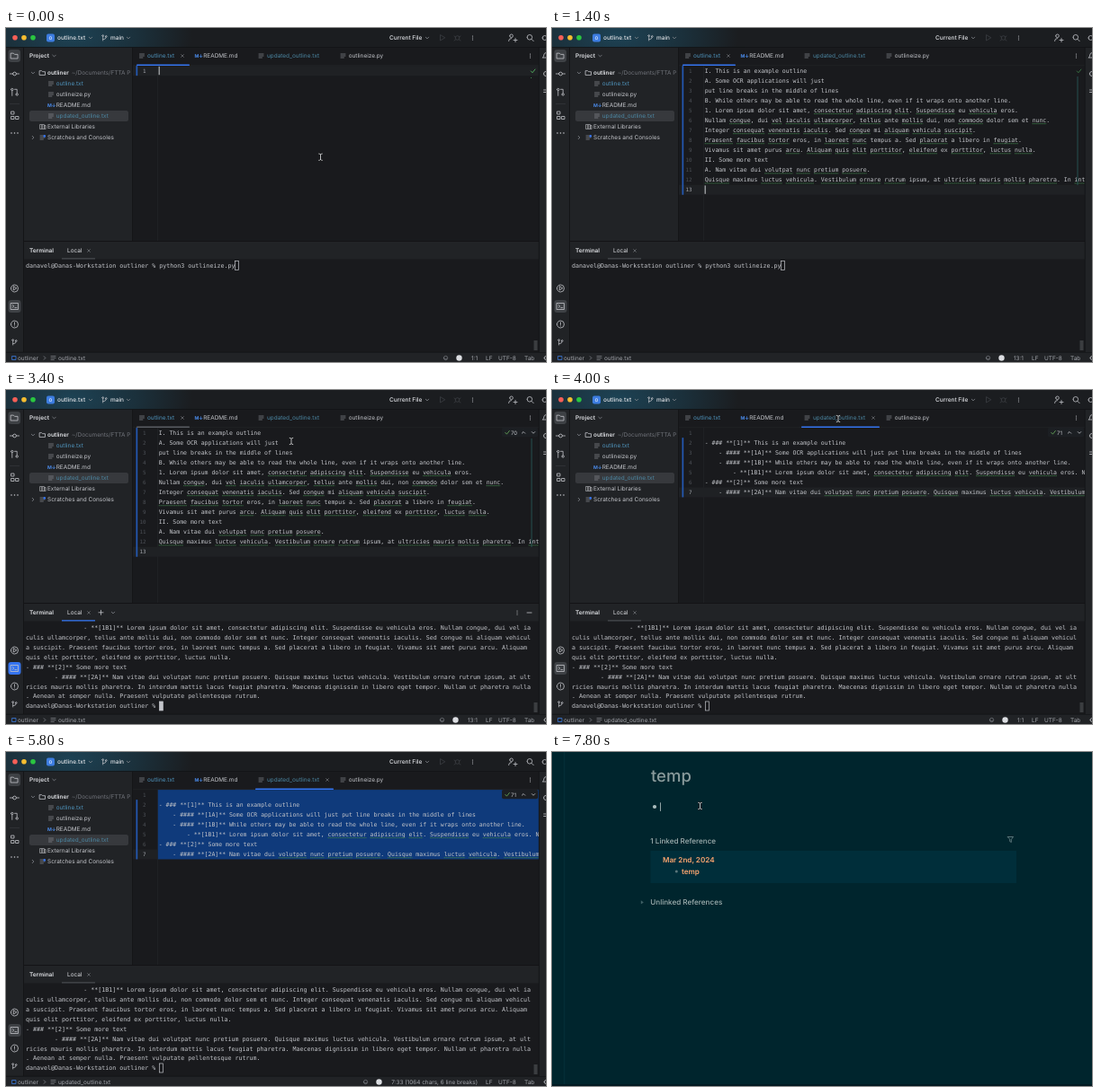
Recreate the animation shown at these times as an HTML page. Size 600x372 px, loop 8 s.

```html
<!DOCTYPE html>
<html lang="en">
<head>
<meta charset="utf-8">
<title>Outline workflow</title>
<style>
  html, body { margin: 0; width: 100%; height: 100%; overflow: hidden; background: #191a1d; }
  svg { display: block; width: 100vw; height: 100vh; }
  text { font-family: Inter, "Open Sans", sans-serif; text-rendering: geometricPrecision; }
  .mono { font-family: "DejaVu Sans Mono", "Noto Sans Mono", monospace; }
  .icon { fill: none; stroke-linecap: round; stroke-linejoin: round; }
</style>
</head>
<body>
<svg id="stage" viewBox="0 0 600 372">
  <defs>
    <radialGradient id="glow" gradientUnits="userSpaceOnUse" cx="72" cy="8" r="135" gradientTransform="translate(0 4) scale(1 .5)">
      <stop offset="0" stop-color="#1d4254"/>
      <stop offset=".55" stop-color="#1b303b"/>
      <stop offset="1" stop-color="#1b1d20"/>
    </radialGradient>
    <clipPath id="treeClip"><rect x="20" y="22" width="120.5" height="215"/></clipPath>
  </defs>
</svg>
<script>
const LOOP = 8000, STEP = 200;
const AT = { paste: 800, terminal: 2000, run: 2400, openTab: 4000, click: 4400, selectAll: 5200, notes: 6000, bright: 6200, edit: 7600 };

const C = { panel: '#212326', editor: '#191a1d', line: '#0f1012', text: '#c3c5ca', dim: '#85888e', faint: '#4d5157',
  blue: '#3574f0', modified: '#4f94bd', added: '#4c87a3', wave: '#3f7f4b' };
const UI = 6.45, CODE = 6.5, TERM = 6.66, MONO = 0.602, ROW = 11.05, CODE_X = 169.7;

const rect = (x, y, w, h, fill, more = '') => `<rect x="${x}" y="${y}" width="${w}" height="${h}" fill="${fill}" ${more}/>`;
const dot = (x, y, r, fill) => `<circle cx="${x}" cy="${y}" r="${r}" fill="${fill}"/>`;
const icon = (d, color = C.text, width = 0.8) => `<path class="icon" d="${d}" stroke="${color}" stroke-width="${width}"/>`;
const label = (x, y, str, fill = C.text, size = UI, more = '') =>
  `<text x="${x}" y="${y + size * 0.36}" font-size="${size}" fill="${fill}" ${more}>${str}</text>`;
const mono = (x, y, str, size, fill = C.text) => {
  const indent = str.search(/\S/);
  return label(x + indent * size * MONO, y, str.trim(), fill, size, 'class="mono"');
};
const ring = (x, y, r) => `M${x - r} ${y}a${r} ${r} 0 1 0 ${2 * r} 0a${r} ${r} 0 1 0 ${-2 * r} 0`;
const chevron = (x, y, color = C.dim) => icon(`M${x - 1.7} ${y - 0.8}l1.7 1.7l1.7 -1.7`, color);
const chevronUp = (x, y) => icon(`M${x - 1.7} ${y + 0.8}l1.7 -1.7l1.7 1.7`);
const chevronRight = (x, y) => icon(`M${x - 0.8} ${y - 1.7}l1.7 1.7l-1.7 1.7`, C.dim);
const cross = (x, y) => icon(`M${x - 1.4} ${y - 1.4}l2.8 2.8m0 -2.8l-2.8 2.8`, C.dim, 0.6);
const kebab = (x, y) => [-2, 0, 2].map(d => dot(x, y + d, 0.6, C.text)).join('');
const fileIcon = (x, y) => icon(`M${x - 2.5} ${y - 2}h5m-5 2h5m-5 2h3.4`, '#8a8d94', 0.7);
const folder = (x, y, s = 1) => icon(`M${x - 3 * s} ${y - 2.3 * s}h${2.2 * s}l${s} ${s}h${2.8 * s}v${3.7 * s}h${-6 * s}z`);
const tick = (x, y, color) => icon(`M${x - 2.2} ${y}l1.6 1.8l3 -3.8`, color, 1);
const branch = (x, y) => icon(`${ring(x - 1.8, y - 2.4, 0.9)}${ring(x + 1.8, y - 1.6, 0.9)}M${x - 1.8} ${y - 1.5}v4.5m0 -1.2q3.6 0 3.6 -2.6`, C.text, 0.7);
const markdown = (x, y) => label(x - 4, y, 'M↓', '#4a8ae8', 5.2, 'font-weight="700"');

const svg = document.getElementById('stage');
function layer(markup, parent = svg) {
  const g = document.createElementNS(svg.namespaceURI, 'g');
  g.innerHTML = markup;
  parent.append(g);
  return g;
}
const show = (g, on) => { g.style.display = on ? '' : 'none'; };

const source = [
  'I. This is an example outline',
  'A. Some OCR applications will just',
  'put line breaks in the middle of lines',
  'B. While others may be able to read the whole line, even if it wraps onto another line.',
  '1. Lorem ipsum dolor sit amet, consectetur adipiscing elit. Suspendisse eu vehicula eros.',
  'Nullam congue, dui vel iaculis ullamcorper, tellus ante mollis dui, non commodo dolor sem et nunc.',
  'Integer consequat venenatis iaculis. Sed congue mi aliquam vehicula suscipit.',
  'Praesent faucibus tortor eros, in laoreet nunc tempus a. Sed placerat a libero in feugiat.',
  'Vivamus sit amet purus arcu. Aliquam quis elit porttitor, eleifend ex porttitor, luctus nulla.',
  'II. Some more text',
  'A. Nam vitae dui volutpat nunc pretium posuere.',
  'Quisque maximus luctus vehicula. Vestibulum ornare rutrum ipsum, at ultricies mauris mollis pharetra. In interdum'
];
const result = [
  '',
  '- ### **[1]** This is an example outline',
  '    - #### **[1A]** Some OCR applications will just put line breaks in the middle of lines',
  '    - #### **[1B]** While others may be able to read the whole line, even if it wraps onto another line.',
  '        - **[1B1]** Lorem ipsum dolor sit amet, consectetur adipiscing elit. Suspendisse eu vehicula eros. Nullam',
  '- ### **[2]** Some more text',
  '    - #### **[2A]** Nam vitae dui volutpat nunc pretium posuere. Quisque maximus luctus vehicula. Vestibulum ornare'
];
const prompt = 'danavel@Danas-Workstation outliner % ';
const command = prompt + 'python3 outlineize.py';
const output = [
  '                - **[1B1]** Lorem ipsum dolor sit amet, consectetur adipiscing elit. Suspendisse eu vehicula eros. Nullam congue, dui vel ia',
  'culis ullamcorper, tellus ante mollis dui, non commodo dolor sem et nunc. Integer consequat venenatis iaculis. Sed congue mi aliquam vehicul',
  'a suscipit. Praesent faucibus tortor eros, in laoreet nunc tempus a. Sed placerat a libero in feugiat. Vivamus sit amet purus arcu. Aliquam ',
  'quis elit porttitor, eleifend ex porttitor, luctus nulla.',
  '- ### **[2]** Some more text',
  '        - #### **[2A]** Nam vitae dui volutpat nunc pretium posuere. Quisque maximus luctus vehicula. Vestibulum ornare rutrum ipsum, at ult',
  'ricies mauris mollis pharetra. In interdum mattis lacus feugiat pharetra. Maecenas dignissim in libero eget tempor. Nullam ut pharetra nulla',
  '. Aenean at semper nulla. Praesent vulputate pellentesque rutrum.',
  prompt
];

const latinLine = /Lorem|Nullam|Integer|Praesent|Vivamus|Nam vitae|Quisque/;
const knownWord = /^(Lorem|ipsum|dolor|sit|amet|Nullam|Integer|ante|non|sem|Sed|tempus|libero|Nam|vitae|eros|maximus|dui|Vivamus|purus)$/;
const rowY = i => 47.6 + i * ROW;

function codeLine(str, i) {
  if (!str) return '';
  let waves = '';
  if (latinLine.test(str)) {
    const start = str.search(latinLine);
    for (const m of str.matchAll(/[A-Za-z]{3,}/g)) {
      if (m.index < start || knownWord.test(m[0])) continue;
      const w = CODE * MONO;
      waves += `M${CODE_X + m.index * w} ${rowY(i) + 3.8}h${m[0].length * w}`;
    }
  }
  return mono(CODE_X, rowY(i), str, CODE) + (waves && `<path d="${waves}" stroke="${C.wave}" stroke-width=".8" stroke-dasharray="1.5 .4"/>`);
}
function gutter(count, current, barFrom) {
  let out = rect(144.5, rowY(barFrom) - 5.5, 1.7, (count - barFrom) * ROW, '#2459b4');
  for (let i = 0; i < count; i++)
    out += label(155.5, rowY(i), i + 1, i === current ? '#a5a8ae' : C.faint, 5.9, 'class="mono" text-anchor="end"');
  return out;
}
const currentRow = i => rect(141, rowY(i) - 5.5, 451, ROW, '#1f2124');
const editorPage = (lines, count, current, barFrom) =>
  currentRow(current) + gutter(count, current, barFrom) + lines.map(codeLine).join('');
const caret = (x, row) => rect(x, rowY(row) - 4.8, 0.9, 9.4, '#dfe1e5');

// Window chrome
const ide = layer('');
layer(
  rect(0, 0, 600, 372, C.panel) + rect(0, 0, 600, 21.5, '#1b1d20') + rect(0, 0, 215, 21.5, 'url(#glow)') +
  rect(141, 22, 451, 215, C.editor) + rect(20, 257.5, 572, 103.5, C.editor) +
  rect(0, 21.2, 600, 0.7, C.line) + rect(19.3, 22, 0.7, 339, C.line) + rect(140.3, 22, 0.7, 215, C.line) +
  rect(20, 237, 572, 0.8, C.line) + rect(0, 360.8, 600, 0.7, C.line) + rect(141, 41.6, 451, 0.5, '#26282b') +
  rect(168.3, 42, 0.5, 195, '#27292d') +
  dot(10, 10.7, 2.8, '#f55f57') + dot(20, 10.7, 2.8, '#f5bd30') + dot(30, 10.7, 2.8, '#2ac640') +
  rect(45, 6.5, 9, 9, '#3d7de0', 'rx="2"') + label(49.5, 11, 'O', '#e8f0ff', 5, 'font-weight="600" text-anchor="middle"') +
  label(57, 11, 'outline.txt', '#e0e2e6', 6.5, 'font-weight="500"') + chevron(94, 11) +
  branch(109.5, 11) + label(116, 11, 'main', '#e0e2e6', 6.5, 'font-weight="500"') + chevron(136, 11) +
  label(426, 11, 'Current File', '#e0e2e6', 6.5, 'font-weight="500"') + chevron(468, 11) +
  icon('M482.5 8v6l5 -3z', '#3b3e43') + icon(ring(501.5, 11, 2.3) + 'M498 9l1.5 1m5.5 -1l-1.5 1m-5.5 4l1.5 -1m5.5 1l-1.5 -1', '#3b3e43') +
  kebab(518.5, 11) +
  icon(ring(561.5, 8.8, 1.8) + 'M558.5 14.5q0 -3 3 -3m2.5 2h4m-2 -2v4') +
  icon(ring(581.8, 10.3, 2.8) + 'M584 12.5l2.2 2.2') + icon(ring(598.5, 11, 2.5)), ide);

// Side strip, project tree and status bar
const tree = [
  [62, 'outline.txt', C.modified, fileIcon], [74, 'outlineize.py', C.text, fileIcon],
  [86, 'README.md', C.text, markdown], [98, 'updated_outline.txt', C.added, fileIcon]
];
layer(
  rect(2.5, 24, 13.5, 14, '#3e4145', 'rx="3"') + folder(9.3, 31, 1.25) +
  icon(ring(9.5, 51, 1.9) + 'M4.5 51h3.1m3.8 0h3.1') +
  icon(ring(6.8, 68.5, 1.2) + ring(12.2, 74, 1.2) + 'M6.8 69.8v5.5m5.4 -2.6v-4.4h-2.6') +
  rect(4, 84, 11, 0.6, '#393b40') +
  icon('M6 93h3v3h-3zM6 98.5h3v3h-3zM11 98.5h3v3h-3z') + [6, 9.5, 13].map(x => dot(x, 117, 0.8, C.text)).join('') +
  icon(ring(9.5, 290, 4) + 'M8.3 288v4l3.2 -2z') + icon(ring(9.5, 330, 4) + 'M9.5 327.8v2.6m0 1.5v.1') + branch(9.5, 350) +
  label(26, 31, 'Project', '#e0e2e6', UI, 'font-weight="600"') + chevron(53.5, 31) +
  rect(26, 92, 110, 12, '#37393d', 'rx="2.5"') +
  chevron(30, 50) + folder(40.5, 50) + label(46, 50, 'outliner', '#e0e2e6', UI, 'font-weight="600"') +
  `<g clip-path="url(#treeClip)">${label(73, 50, '~/Documents/FTTA P', '#70737a')}</g>` +
  tree.map(([y, name, color, draw]) => draw(50, y) + label(55.7, y, name, color)).join('') +
  icon('M38 107.5h1.8v5h-1.8zm2.6 0h1.8v5h-1.8zm2.5 1h1v4h-1z', C.text, 0.6) + label(46, 110, 'External Libraries') +
  chevronRight(30, 122) + fileIcon(40.5, 122) + dot(42.8, 120.4, 1.3, C.blue) + label(46, 122, 'Scratches and Consoles') +
  icon('M7 365.5h4v4h-4z', '#3d7de0') + label(13, 367.5, 'outliner', '#a4a7ad') + chevronRight(43, 367.5) + fileIcon(52.5, 367.5) +
  label(533, 367.5, 'LF', '#a4a7ad') + label(547, 367.5, 'UTF-8', '#a4a7ad') + label(576, 367.5, 'Tab', '#a4a7ad'), ide);

// Editor pages
const emptyPage = layer(editorPage([], 1, 0, 0) + tick(585.5, 48, '#4ea35a') + rect(583, 55, 1, 1, C.wave), ide);
const pastedPage = layer(editorPage(source, 13, 12, 0) + rect(583.6, 54, 0.8, 121, '#285f5c'), ide);
const checking = layer(tick(585.5, 48, '#376c40'), ide);
const resultPage = layer(currentRow(6), ide);
const selection = layer(rect(168.8, 42.1, 423.2, 7 * ROW, '#0f3a7b'), resultPage);
layer(gutter(7, 6, 1) + result.map(codeLine).join(''), resultPage);
const problems = n => rect(551, 41.8, 40, 10.5, '#1c1f23', 'rx="2"') + tick(557, 47.4, '#5a9150') +
  label(561, 47.6, n, C.text, 6) + chevronUp(575, 47.4) + chevron(586, 47.4, C.text);
const problems70 = layer(problems(70), ide), problems71 = layer(problems(71), ide);
const carets = [[CODE_X, 0], [CODE_X, 12], [CODE_X + 32 * CODE * MONO, 6]].map(([x, row]) => layer(caret(x, row), ide));

// Editor tabs
layer(
  fileIcon(151, 31) + label(157, 31, 'outline.txt', C.modified) + markdown(213.5, 31) + label(219.2, 31, 'README.md') +
  fileIcon(283.5, 31) + label(290, 31, 'updated_outline.txt', C.added) +
  fileIcon(374.5, 31) + label(380.7, 31, 'outlineize.py') + kebab(582.5, 31), ide);
const underline = (x, w) => rect(x, 40.6, w, 1.3, C.blue, 'rx=".6"');
const firstTab = layer(cross(196, 31) + underline(145, 59), ide);
const secondTab = layer(cross(357, 31) + underline(277, 87), ide);
const firstLine = firstTab.querySelector('rect');

// Terminal
layer(label(26, 248, 'Terminal', '#e0e2e6', UI, 'font-weight="600"') + label(68, 248, 'Local', '#e0e2e6') + cross(92, 248) +
  rect(586.5, 348, 4, 11, '#3b3d40'), ide);
const localLine = layer(rect(62, 256.2, 37, 1.3, C.blue), ide).firstChild;
const termY = i => 264.6 + i * 10.92;
const termX = n => 22 + n * TERM * MONO;
const idleTerm = layer(mono(22, termY(0), command, TERM), ide);
const doneTerm = layer(output.map((s, i) => mono(22, termY(i), s, TERM)).join(''), ide);
const block = layer(rect(0, 0, 4, 10, 'none', 'stroke="#c3c5ca" stroke-width=".7"'), ide);
const termTools = layer(icon('M103 247.8h5m-2.5 -2.5v5') + chevron(119, 248) + kebab(568, 248) + icon('M579 248h5'), ide);
const termButton = layer(rect(2.5, 303, 14, 14, C.blue, 'rx="3"'), ide).firstChild;
layer(icon('M5.5 306.5h8v7h-8zm1.8 2l1.5 1.4l-1.5 1.4m2.6 .3h2'), ide);

// Status text and right edge
const statusFile = layer(label(58, 367.5, '', '#a4a7ad'), ide).firstChild;
const statusPos = layer(label(524, 367.5, '', '#a4a7ad', UI, 'text-anchor="end"'), ide).firstChild;
const statusIcons = layer(icon(ring(0, 367.5, 2.2) + 'M-1.2 368.3q1.2 1.2 2.4 0', '#8a8d94', 0.6) + dot(15, 367.5, 3.2, '#dcdee2'), ide);
layer(rect(592, 22, 8, 339, C.panel) + rect(591.8, 22, 0.7, 339, C.line) +
  icon('M596.5 33q1.2 -1 1.2 -3q.3 -2.5 2.3 -2.5m-3.5 5.5h4') + icon(ring(600, 51, 2.6)) + icon('M597.5 69h3m-3 2.5h3') + icon(ring(600, 367.5, 2)), ide);

// Notes page
const notes = layer(rect(0, 0, 600, 372, '#00252d') + rect(13.5, 0, 0.7, 370, '#073640') + rect(0, 370, 600, 2, '#021a22') +
  rect(109.5, 110, 406.5, 36, '#002e3a'));
const shade = layer(rect(0, 0, 600, 372, '#001a20', 'opacity=".45"') +
  '<g fill="#022b3b" opacity=".3"><path d="M14 0H402L370 70L330 112L290 145L210 128L120 175L14 140z"/>' +
  '<path d="M0 285L150 305L260 260L420 290L600 225V372H0z"/><path d="M435 268L468 232L490 226L462 262z"/></g>', notes);
const page = layer(
  label(110, 26.5, 'temp', '#8a9b9c', 18.5, 'font-weight="500"') + dot(114, 61, 1.5, '#809698') +
  label(109.3, 99, '1 Linked Reference', '#a0b0b0', 8.1, 'font-weight="500"') +
  icon('M506.5 94.5h6l-2.2 3v3l-1.6 -1v-2z', '#82989b', 0.7) +
  label(123, 120, 'Mar 2nd, 2024', '#fba56f', 8.1, 'font-weight="600"') +
  dot(138.3, 133, 1.5, '#5b777c') + label(144, 133, 'temp', '#fba56f', 8.1, 'font-weight="600"') +
  '<path d="M98.8 165.2l3 2.2l-3 2.2z" fill="#3f6066"/>' +
  label(109.3, 167.5, 'Unlinked References', '#a0b0b0', 8.1, 'font-weight="500"'), notes);
const editing = layer(dot(114, 61, 2.1, '#a9bbbb') + rect(120.2, 56.3, 0.8, 9.6, '#b4c2c2'), notes);

const beam = 'M-1.8 -3.7q1.4 0 1.8 1q.4 -1 1.8 -1M0 -2.7v5.4M-1.8 3.7q1.4 0 1.8 -1q.4 1 1.8 1';
const pointer = layer(icon(beam, '#111', 1.5) + icon(beam, '#e8eaed', 0.8));

// Each stroke of the pointer: [time, x, y] stops; hidden outside them
const strokes = [
  [[0, 349.5, 143.7], [600, 349.5, 143.7]],
  [[1600, 349, 144], [2000, 230, 285], [2200, 230, 285]],
  [[2800, 240, 240], [3400, 317, 57], [3600, 317, 50], [4000, 318, 32], [4400, 294, 121], [5000, 294, 121]],
  [[7400, 155, 131], [7600, 164, 61], [7800, 164.5, 60]]
];
const ease = k => k * k * (3 - 2 * k);
function pointerAt(t) {
  const stops = strokes.find(s => t >= s[0][0] && t <= s.at(-1)[0]);
  if (!stops) return null;
  const i = Math.max(1, stops.findIndex(s => s[0] >= t));
  const [t0, x0, y0] = stops[i - 1], [t1, x1, y1] = stops[i];
  const k = ease((t - t0) / (t1 - t0));
  return [x0 + (x1 - x0) * k, y0 + (y1 - y0) * k];
}

function render(now) {
  const t = Math.floor((now % LOOP) / STEP) * STEP;
  const pasted = t >= AT.paste, opened = t >= AT.openTab, ran = t >= AT.run;
  const focused = t >= AT.terminal && !opened;
  const clicked = t >= AT.click, selected = t >= AT.selectAll;

  show(ide, t < AT.notes);
  show(notes, t >= AT.notes);
  show(emptyPage, !pasted);
  show(pastedPage, pasted && !opened);
  show(checking, pasted && t < AT.terminal);
  show(resultPage, opened);
  show(selection, selected);
  show(problems70, focused);
  show(problems71, opened);
  show(carets[0], !pasted);
  show(carets[1], pasted && !focused && !opened);
  show(carets[2], clicked && !selected);
  show(firstTab, !opened);
  show(secondTab, opened);
  firstLine.setAttribute('fill', focused ? '#5a5d63' : C.blue);
  localLine.setAttribute('fill', focused ? C.blue : '#46494e');
  show(idleTerm, !ran);
  show(doneTerm, ran);
  show(termTools, focused);
  termButton.setAttribute('fill', focused ? C.blue : '#3e4145');
  block.setAttribute('transform', ran ? `translate(${termX(prompt.length)} ${termY(8) - 5})` : `translate(${termX(command.length)} ${termY(0) - 5})`);
  block.firstChild.setAttribute('fill', focused ? C.text : 'none');

  statusFile.textContent = opened ? 'updated_outline.txt' : 'outline.txt';
  const [pos, iconX] = selected ? ['7:33 (1064 chars, 6 line breaks)', 399.5] : clicked ? ['7:33', 482.5] :
    opened || !pasted ? ['1:1', 488.5] : ['13:1', 484.5];
  statusPos.textContent = pos;
  statusIcons.setAttribute('transform', `translate(${iconX} 0)`);

  show(shade, t < AT.bright);
  page.setAttribute('opacity', t < AT.bright ? 0.82 : 1);
  show(editing, t >= AT.edit);

  const at = pointerAt(t);
  show(pointer, at);
  if (at) pointer.setAttribute('transform', `translate(${at})`);
}

const start = performance.now();
function tickFrame() {
  render(performance.now() - start);
  requestAnimationFrame(tickFrame);
}
tickFrame();
</script>
</body>
</html>
```
